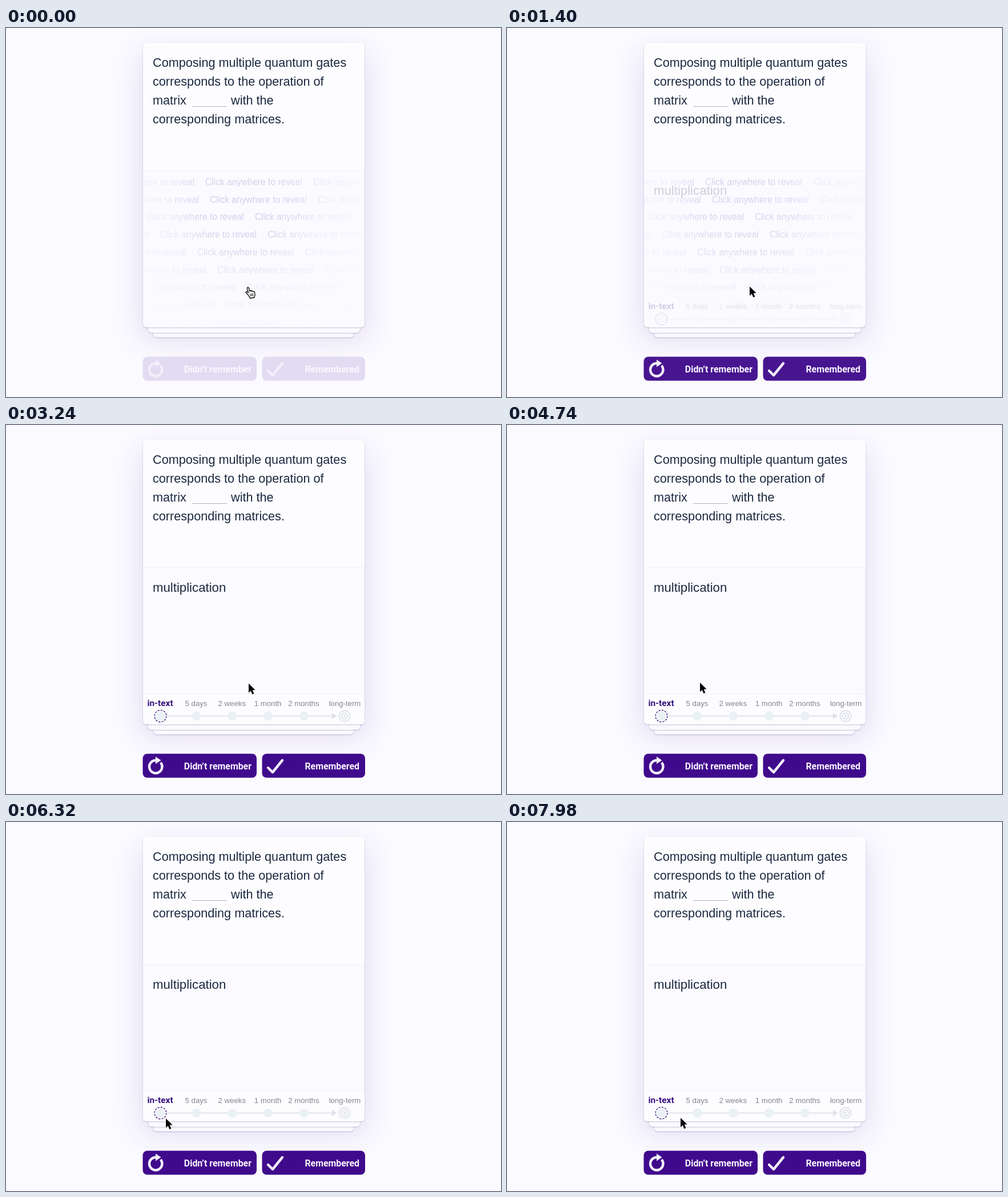
These frames come from a looping animation (867x646 px, 8 s). An HTML page:

```html
<!DOCTYPE html>
<html lang="en">
<head>
<meta charset="utf-8">
<title>Flash card</title>
<style>
  html, body { margin: 0; width: 100%; height: 100%; overflow: hidden; background: #fbfaff; }
  svg { display: block; width: 100%; height: 100%; font-family: "Liberation Sans", Arial, sans-serif; }
  .body { font-size: 21.65px; fill: #1b2840; }
  .hint { font-size: 15.6px; fill: #3c0f8c; }
  .stage { font-size: 13.2px; fill: #84858f; text-anchor: middle; }
  .semi { font-family: Roboto, "Liberation Sans", sans-serif; font-weight: 600; }
  .button { font-size: 15.9px; fill: #faf7ff; text-anchor: end; }
  .icon { fill: none; stroke: #f3eefb; }
</style>
</head>
<body>
<svg viewBox="0 0 867 646">
  <defs>
    <filter id="glow" x="-30%" y="-30%" width="160%" height="160%"><feGaussianBlur stdDeviation="25"/></filter>
    <filter id="edge" x="-5%" y="-5%" width="110%" height="110%"><feGaussianBlur stdDeviation="1"/></filter>
    <radialGradient id="falloff" gradientUnits="userSpaceOnUse" cx="0" cy="0" r="1"
      gradientTransform="translate(415 305) scale(225 225)">
      <stop offset="0" stop-color="#fff"/>
      <stop offset=".35" stop-color="#fff" stop-opacity=".85"/>
      <stop offset=".6" stop-color="#fff" stop-opacity=".36"/>
      <stop offset="1" stop-color="#fff" stop-opacity=".04"/>
    </radialGradient>
    <mask id="fade" maskUnits="userSpaceOnUse" x="240" y="250" width="388" height="274">
      <rect x="240" y="250" width="388" height="274" fill="url(#falloff)"/>
    </mask>
  </defs>

  <rect width="867" height="646" fill="#fbfaff"/>
  <rect x="236" y="42" width="396" height="504" rx="12" fill="#4a20a0" opacity=".13" filter="url(#glow)"/>
  <g id="cards"></g>
  <path d="M240 250V32a6 6 0 0 1 6-6h376a6 6 0 0 1 6 6v218z" fill="#fdfdff"/>
  <path d="M240 249.5h388" stroke="#f2f1f7"/>

  <g class="body">
    <text x="257" y="68">Composing multiple quantum gates</text>
    <text x="257" y="101">corresponds to the operation of</text>
    <text x="257" y="134">matrix</text>
    <text x="394" y="134">with the</text>
    <text x="257" y="167">corresponding matrices.</text>
  </g>
  <path d="M326 137.5h61" stroke="#b0b4be"/>

  <g id="hints" mask="url(#fade)" class="hint"></g>

  <g id="answer">
    <text class="body" x="257" y="292" style="font-size:22.2px">multiplication</text>
    <path d="M240 472h388v46a6 6 0 0 1-6 6H246a6 6 0 0 1-6-6z" fill="#fdfdff"/>
    <path d="M240 471.5h388" stroke="#f2f1f7"/>
    <path d="M282 509.5h290" stroke="#e1e4ec" stroke-width="2"/>
    <path d="M571 504l8 5.5-8 5.5z" fill="#dde1ea"/>
    <g id="stages"></g>
    <text class="semi" x="270" y="491.5" text-anchor="middle" font-size="15.4" fill="#36107f">in-text</text>
    <circle cx="270.5" cy="509.5" r="10.3" fill="none" stroke="#2f0c78" stroke-width="1.3" stroke-dasharray="3.2 2.2"/>
    <g fill="none" stroke="#dfe3eb" stroke-width="2">
      <circle cx="593" cy="509.5" r="9.6"/><circle cx="593" cy="509.5" r="5.3"/>
      <circle cx="593" cy="509.5" r="2" fill="#dfe3eb" stroke="none"/>
    </g>
  </g>

  <g id="buttons">
    <rect x="239.5" y="575.5" width="199.5" height="42" rx="8"/>
    <rect x="448.5" y="575.5" width="180.5" height="42" rx="8"/>
  </g>
  <g class="semi button">
    <text x="430" y="603">Didn’t remember</text>
    <text x="619" y="603">Remembered</text>
  </g>
  <path class="icon" d="M270.8 591a11.2 11.2 0 1 1-8.8-4h2" stroke-width="4.4"/>
  <path d="M262 580.5l9.5 6.5-9.5 6.5z" fill="#f3eefb"/>
  <path class="icon" d="M459 600l8 8 17-21" stroke-width="4.4" stroke-linecap="round" stroke-linejoin="round"/>

  <g id="hand" transform="translate(419 453)" stroke="#000" stroke-width="1.3" stroke-linejoin="round" stroke-linecap="round">
    <path fill="#fff" d="M5 14L1.5 10.7C0 9 2 7.5 3.5 9l2 1.6L3.4 3C3 .5 5.5 0 6.3 2.3L8 8c0-2 2.5-2 3 0 .3-1.5 2.3-1.2 2.7.7.8-1.2 2.6-.5 2.8 1.3l.5 4c0 2-1 3-1.2 5L8.3 20C7.5 17.5 6 16 5 14z"/>
    <path fill="none" stroke-width="1" d="M8.8 12.5l.6 4M11.2 12.2l.5 4M13.5 12l.4 4"/>
  </g>
  <path id="arrow" d="M0 0V16.2L3.7 12.8 6.4 19 9.4 17.7 6.7 11.6H11.6z" fill="#000" stroke="#fff" stroke-width="1.2" paint-order="stroke"/>
</svg>
<script>
const LOOP = 8000;
const $ = id => document.getElementById(id);

function add(parent, tag, attrs, text = '') {
  const el = document.createElementNS('http://www.w3.org/2000/svg', tag);
  for (const name in attrs) el.setAttribute(name, attrs[name]);
  el.textContent = text;
  return parent.appendChild(el);
}

// Stack of cards, back to front: left, right, top, bottom.
for (const [l, r, t, b] of [[258, 609, 480, 541.5], [249, 620, 470, 533.5], [240, 628, 26, 524]]) {
  const box = { x: l, y: t, width: r - l, height: b - t, rx: 6 };
  add($('cards'), 'rect', { ...box, y: t + 1, fill: '#3c2a70', opacity: .27, filter: 'url(#edge)' });
  add($('cards'), 'rect', { ...box, fill: '#fbfaff' });
}

const PERIOD = 189;
const rows = [349, 357, 436, 269, 335, 370, 422, 384, 320].map((x, i) => {
  const row = add($('hints'), 'g', { opacity: .2 });
  for (let k = -2; k <= 2; k++)
    add(row, 'text', { x: x + k * PERIOD, y: 275 + i * 30.7 }, 'Click anywhere to reveal');
  return row;
});

['5 days', '2 weeks', '1 month', '2 months', 'long-term'].forEach((label, i) => {
  const x = 333 + i * 62.8;
  add($('stages'), 'text', { class: 'stage', x: i < 4 ? x : 593.5, y: 491.5 }, label);
  add($('stages'), 'circle', { cx: i < 4 ? x + .5 : 270.5, cy: 509.5, r: 8, fill: '#e9f1f5' });
});

const smooth = (t, start, end) => {
  const p = Math.min(1, Math.max(0, (t - start) / (end - start)));
  return p * p * (3 - 2 * p);
};
const mix = (a, b, p) => a + (b - a) * p;

// Pointer stops: time, x, y.
const path = [[0, 425, 452.5], [4150, 425, 452.5], [4740, 338, 451], [5500, 280, 519], [6900, 280, 519], [7900, 304, 518], [LOOP, 304, 518]];

function pointer(t) {
  const i = path.findIndex(stop => stop[0] > t);
  const [from, to] = [path[i - 1], path[i]];
  const p = smooth(t, from[0], to[0]);
  return [mix(from[1], to[1], p), mix(from[2], to[2], p)];
}

function draw(now) {
  const t = now % LOOP;
  rows.forEach((row, i) =>
    row.setAttribute('transform', `translate(${(i % 2 ? 1 : -1) * t * .0014} 0)`));

  $('answer').setAttribute('opacity', smooth(t, 1230, 1830));
  $('hints').setAttribute('opacity', 1 - smooth(t, 1300, 1830));

  const on = smooth(t, 1090, 1450);
  const [idle, active] = [[227, 219, 241], [64, 10, 140]];
  $('buttons').setAttribute('fill', `rgb(${idle.map((c, i) => mix(c, active[i], on))})`);

  const clicked = t >= 1120;
  $('hand').setAttribute('visibility', clicked ? 'hidden' : 'visible');
  $('arrow').setAttribute('visibility', clicked ? 'visible' : 'hidden');
  $('arrow').setAttribute('transform', `translate(${pointer(t)})`);
}

const start = performance.now();
function frame() {
  draw(performance.now() - start);
  requestAnimationFrame(frame);
}
frame();
</script>
</body>
</html>
```
